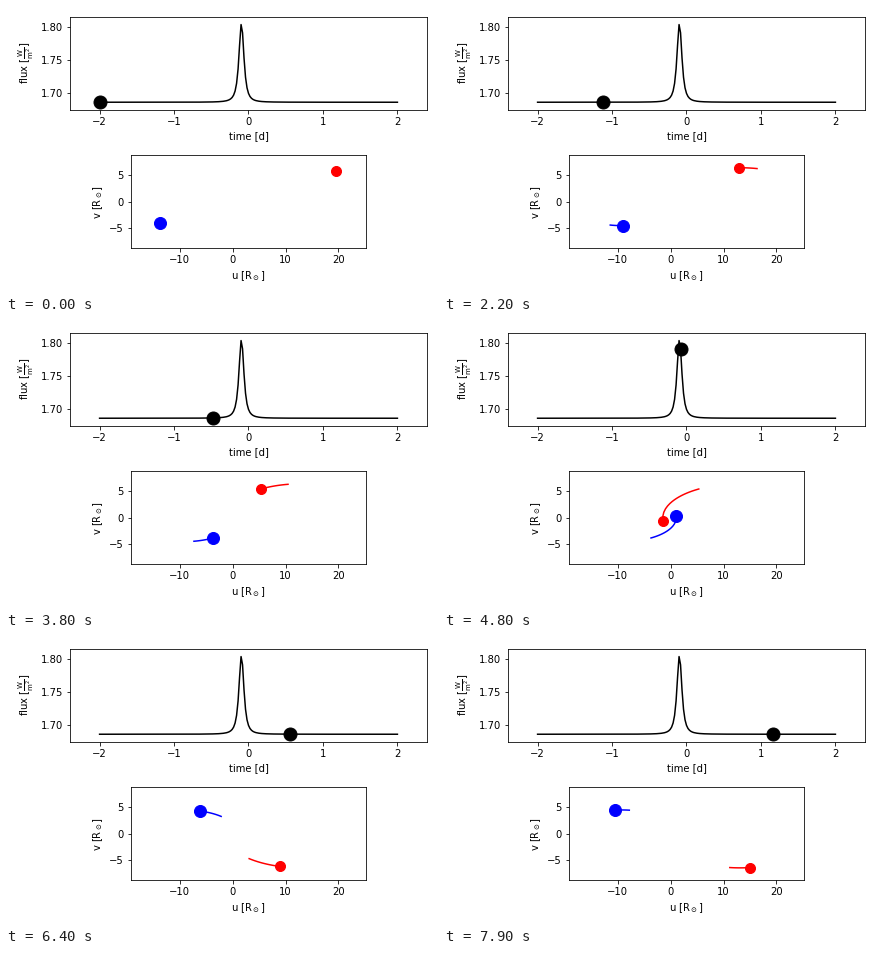
A matplotlib script that plays this animation: 432 px wide and 288 px high, repeating every 8000 ms.

```python
import numpy as np
import matplotlib.pyplot as plt
from matplotlib.animation import FuncAnimation

W, H, DPI = 432, 288, 72
FRAMES, INTERVAL = 80, 100
STRIDE, TAIL = 2, 20          # samples per frame, samples in a trail

# Binary orbit: semi-major axis (R_sun), eccentricity, mean motion, periastron
A, ECC, N, T0 = 14.6, 0.8975, 0.643, -0.093
RATIO = 0.7                   # mass ratio
BASE, PEAK, T_PEAK = 1.6862, 1.8036, -0.095

plt.rcParams.update({"font.family": "DejaVu Sans", "font.size": 10})


def eccentric_anomaly(dt):
    grid = np.linspace(-np.pi, np.pi, 40001)
    return np.interp(N * dt, grid - ECC * np.sin(grid), grid)


def orbit(t):
    ea = eccentric_anomaly(t - T0)
    return np.array([A * (ECC - np.cos(ea)),
                     -A * np.sqrt(1 - ECC**2) * np.sin(ea)])


def light_curve(t):
    ea = eccentric_anomaly(t - T_PEAK)
    bump = ((1 - ECC * np.cos(ea)) / (1 - ECC)) ** -3.4
    return BASE + (PEAK - BASE) * bump / bump.max()


def add_axes(left, top, right, bottom, xlabel, ylabel):
    ax = fig.add_axes([left / W, 1 - bottom / H,
                       (right - left) / W, (bottom - top) / H])
    ax.set_xlabel(xlabel)
    ax.set_ylabel(ylabel)
    return ax


time = np.linspace(-2, 2, 201)
flux = light_curve(time)
red_path = orbit(time) * [[-1], [1]]
red_path[0] = -A * np.cos(eccentric_anomaly(time - T0)) + A * ECC
blue_path = -RATIO * red_path

fig = plt.figure(figsize=(W / DPI, H / DPI), dpi=DPI, facecolor="white")

top = add_axes(63.8, 10.8, 421.2, 104.0, "time [d]",
               r"flux [$\mathrm{\frac{W}{m^2}}$]")
top.plot(time, flux, color="k", lw=1.5)
top.margins(0.1)
top.set_xticks([-2, -1, 0, 1, 2])
top.set_yticks([1.70, 1.75, 1.80])
dot, = top.plot([], [], "o", color="k", ms=13)

sky = add_axes(125.0, 149.2, 360.0, 242.4,
               r"u [$\mathrm{R_\odot}$]", r"v [$\mathrm{R_\odot}$]")
sky.set(xlim=(-19.22, 25.2), ylim=(-8.81, 8.81),
        xticks=[-10, 0, 10, 20], yticks=[-5, 0, 5])

stars = []
for path, color, size in ((red_path, "r", 10), (blue_path, "b", 12)):
    trail, = sky.plot([], [], color=color, lw=1.5)
    head, = sky.plot([], [], "o", color=color, ms=size)
    stars.append((path, trail, head))


def update(frame):
    k = frame * STRIDE
    dot.set_data([time[k]], [flux[k]])
    artists = [dot]
    for path, trail, head in stars:
        trail.set_data(*path[:, max(k - TAIL, 0):k + 1])
        head.set_data(*path[:, k:k + 1])
        artists += [trail, head]
    return artists


anim = FuncAnimation(fig, update, frames=FRAMES, interval=INTERVAL,
                     repeat=True, repeat_delay=0, blit=False)
plt.show()
```
